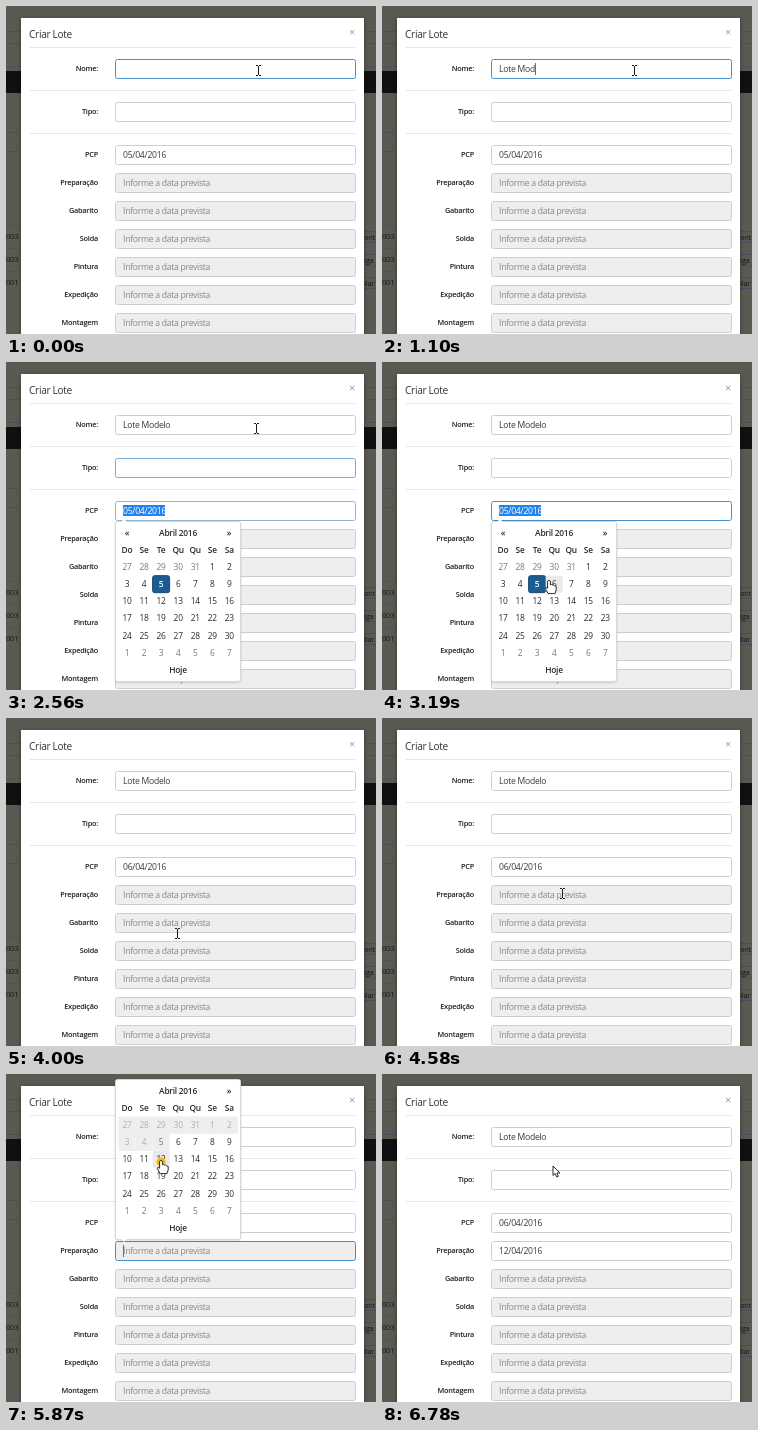
Write an HTML page with a canvas that moves like this. It is 370 px wide and 328 px high and loops after 6.81 s.

```html
<!DOCTYPE html>
<html lang="pt">
<head>
<meta charset="utf-8">
<title>Criar Lote</title>
<style>
  html, body { margin: 0; height: 100%; overflow: hidden; background: #5b5a52; }
  canvas { display: block; }
</style>
</head>
<body>
<canvas id="stage" width="370" height="328"></canvas>
<script>
const ctx = document.getElementById('stage').getContext('2d');
const LOOP = 6810;
const FONT = '"Open Sans", "Noto Sans", sans-serif';
const NAME = 'Lote Modelo';
const KEY_TIMES = [230, 290, 490, 560, 640, 710, 940, 1100, 1260, 1420, 1450];
const HINT = 'Informe a data prevista';
const PICK_PCP = 3480, PICK_PREP = 5960;   // moments a date is accepted
const BORDER = [200, 207, 217], FOCUS = [70, 144, 198];

// Pointer path: time, x, y
const PATH = [
  [0, 252, 64], [2520, 252, 64], [2650, 243, 74], [3060, 168, 221], [3190, 167, 218],
  [3500, 167, 218], [4000, 171, 215], [4100, 171, 215], [4700, 181, 170], [5180, 181, 170],
  [5800, 155, 86], [6000, 155, 86], [6520, 163, 88], [6600, 163, 88], [6780, 171, 91.5]
];

const clamp = v => Math.max(0, Math.min(1, v));
const between = (t, a, b) => t >= a && t < b;
const fade = (t, on, off) => clamp((t - on) / 150) - clamp((t - off) / 150);
const mix = (a, b, k) => `rgb(${a.map((v, i) => Math.round(v + (b[i] - v) * k))})`;

function setFont(size, weight = 400) {
  ctx.font = `${weight} ${size}px ${FONT}`;
  ctx.letterSpacing = `${-0.03 * size}px`;
}

function text(str, x, y, size, color, weight, align = 'left') {
  setFont(size, weight);
  ctx.fillStyle = color;
  ctx.textAlign = align;
  ctx.fillText(str, x, y);
}

function rect(x, y, w, h, color) {
  ctx.fillStyle = color;
  ctx.fillRect(x, y, w, h);
}

function roundBox(x, y, w, h, r, fill, stroke) {
  ctx.beginPath();
  ctx.roundRect(x, y, w, h, r);
  ctx.fillStyle = fill;
  ctx.fill();
  if (stroke) {
    ctx.shadowColor = 'transparent';
    ctx.strokeStyle = stroke;
    ctx.lineWidth = 1;
    ctx.stroke();
  }
}

function shadow(color, blur, dy) {
  ctx.shadowColor = color;
  ctx.shadowBlur = blur;
  ctx.shadowOffsetY = dy;
}

function drawPage() {
  rect(0, 0, 370, 328, '#5b5a52');
  for (const y of [25, 37, 60]) rect(0, y, 370, 1, '#4c5059');
  rect(0, 65, 370, 22, '#101010');
  for (const y of [126, 145]) rect(0, y, 13, 1, '#505054');
  ['003', '003', '001'].forEach((code, i) => {
    const y = 233 + i * 23;
    rect(0, y - 14, 15, 1, '#53534f');
    text(code, 0, y, 7.6, '#15181f');
    ctx.strokeStyle = '#474d5c';
    ctx.lineWidth = 1;
    ctx.strokeRect(350.5, y - 7.5, 30, 11);
    text(['ont', 'iga', 'ilar'][i], 358, y + 1, 7.6, '#15181f');
  });
}

function drawModal() {
  shadow('rgba(0,0,0,.35)', 5, 1);
  rect(15, 12, 343, 330, '#fff');
  shadow('transparent', 0, 0);
  text('Criar Lote', 23, 32, 10.1, '#2f343a');
  text('×', 346, 30, 11, '#999', 400, 'center');
  for (const y of [41, 84, 127]) rect(24, y, 325, 1, '#e6e6e6');
}

function drawField(f) {
  roundBox(109.5, f.y + .5, 240, 19, 2, f.disabled ? '#eee' : '#fff',
    mix(BORDER, FOCUS, f.focus || 0));
  text(f.label, 92, f.y + 12, 7.3, '#1c1c1c', 600, 'right');
  if (f.selected) rect(117, f.y + 4, 42, 11, '#2484ee');
  if (f.value) text(f.value, 117, f.y + 13, 8.6, f.selected ? '#fff' : '#383838');
  else if (f.disabled) text(HINT, 117, f.y + 13, 8.6, '#868686');
  if (f.caret) {
    setFont(8.6);
    rect(Math.round(117 + ctx.measureText(f.value || '').width), f.y + 4, 1, 12, '#707070');
  }
}

function drawFields(t) {
  const typed = NAME.slice(0, KEY_TIMES.filter(k => k <= t).length);
  const prepDone = t >= PICK_PREP;
  const fields = [
    { label: 'Nome:', y: 53, value: typed, focus: 1 - clamp((t - 2060) / 150),
      caret: between(t, 230, 1980) },
    { label: 'Tipo:', y: 96, focus: fade(t, 2060, 2500), caret: between(t, 2060, 2500) },
    { label: 'PCP', y: 139, value: t < PICK_PCP ? '05/04/2016' : '06/04/2016',
      focus: fade(t, 2500, PICK_PCP), selected: between(t, 2500, PICK_PCP) },
    { label: 'Preparação', y: 167, value: prepDone ? '12/04/2016' : '', disabled: !prepDone,
      focus: fade(t, 4730, PICK_PREP),
      caret: between(t, 4730, PICK_PREP) && Math.floor((t - 4730) / 500) % 2 === 0 }
  ];
  ['Gabarito', 'Solda', 'Pintura', 'Expedição', 'Montagem'].forEach((label, i) =>
    fields.push({ label, y: 195 + 28 * i, disabled: true }));
  fields.forEach(drawField);
}

// Calendar with its top edge at y; "limited" greys out the days before the 6th.
function drawPicker(y, limited, pointer) {
  const colX = c => 121 + c * 17.05;
  const rowY = r => y + 46 + r * 17.15;
  const heading = (str, x, dy) => text(str, x, y + dy, 8.4, '#2a2a2a', 600, 'center');
  shadow('rgba(0,0,0,.18)', 3, 1);
  roundBox(109.5, y + .5, 125, 160, 2, '#fff', '#d6d6d6');
  shadow('transparent', 0, 0);

  const tip = limited ? y + 163 : y - 2, base = limited ? y + 160 : y + 1;
  ctx.beginPath();
  ctx.moveTo(115, base);
  ctx.lineTo(118, tip);
  ctx.lineTo(121, base);
  ctx.fillStyle = '#fff';
  ctx.fill();

  if (!limited) heading('«', 121, 15);
  heading('Abril 2016', 172, 15);
  heading('»', 223, 15);
  ['Do', 'Se', 'Te', 'Qu', 'Qu', 'Se', 'Sa'].forEach((day, c) => heading(day, colX(c), 32));

  for (let i = 0; i < 42; i++) {
    const c = i % 7, r = Math.floor(i / 7), x = colX(c), cy = rowY(r);
    const day = i < 5 ? 27 + i : (i - 5) % 30 + 1;
    const outside = i < 5 || i > 34;
    const blocked = limited && i < 9;
    const current = i === 9;
    const hovered = !blocked && Math.abs(pointer.x - x) < 8.5 && Math.abs(pointer.y - cy) < 8.5;
    let color = outside ? '#777' : '#2a2a2a';
    if (blocked) color = '#b0b0b0';
    if (limited && i <= 9) rect(x - 8.5, cy - 8.5, 17.1, 17.2, '#eee');
    if (limited && current) color = '#66758a';
    if (hovered) roundBox(x - 8.5, cy - 8.5, 17, 17, 2, '#eaeaea');
    if (current && !limited) {
      roundBox(x - 8.5, cy - 8.5, 17, 17, 2, '#1d5c93', '#174a77');
      color = '#fff';
    }
    text(day, x, cy + 3, 8.4, color, current && !limited ? 600 : 400, 'center');
  }
  heading('Hoje', 172, 152);
}

function pointerAt(t) {
  let i = PATH.findIndex(p => p[0] > t);
  if (i < 0) i = PATH.length;
  const a = PATH[i - 1], b = PATH[i] || a;
  const k = clamp((t - a[0]) / (b[0] - a[0] || 1));
  const e = k * k * (3 - 2 * k);
  return { x: a[1] + (b[1] - a[1]) * e, y: a[2] + (b[2] - a[2]) * e };
}

const SHAPES = {
  arrow: new Path2D('M0 0V9.5L2.2 7.5L3.8 11L5.4 10.3L3.9 7H7Z'),
  hand: new Path2D('M-1.4 1.2Q0 -.6 1.4 1.2V4.8Q2.5 4 3.5 5.1Q4.6 4.5 5.4 5.7Q7 5.4 7.2 7V9.8L6 13.6H-.8L-3.8 8.6Q-4 6.6 -1.4 8.2Z')
};

function drawPointer({ x, y }, overPicker) {
  const overField = [53, 96, 139, 167, 195, 223].some(top => y >= top && y <= top + 20);
  ctx.save();
  ctx.translate(Math.round(x), Math.round(y));
  if (!overPicker && overField) {
    rect(0, -4, 1, 9, '#1a1a1a');
    for (const end of [-5, 5]) {
      rect(-2, end, 2, 1, '#1a1a1a');
      rect(1, end, 2, 1, '#1a1a1a');
    }
  } else {
    const shape = SHAPES[overPicker ? 'hand' : 'arrow'];
    ctx.lineWidth = 1;
    ctx.lineJoin = 'round';
    ctx.fillStyle = '#fff';
    ctx.strokeStyle = '#2a2a2a';
    ctx.fill(shape);
    ctx.stroke(shape);
  }
  ctx.restore();
}

function draw(t) {
  const pointer = pointerAt(t);
  const below = between(t, 2500, PICK_PCP), above = between(t, 4730, PICK_PREP);
  drawPage();
  drawModal();
  drawFields(t);
  if (below) drawPicker(159, false, pointer);
  if (above) drawPicker(5, true, pointer);
  if (between(t, 3390, PICK_PCP) || between(t, 5840, PICK_PREP)) {
    ctx.beginPath();
    ctx.arc(pointer.x, pointer.y + 2, 4.5, 0, 7);
    ctx.fillStyle = '#f3b90f';
    ctx.fill();
  }
  drawPointer(pointer, below && pointer.y > 159 || above && pointer.y < 165);
}

const start = performance.now();
function tick() {
  draw((performance.now() - start) % LOOP);
  requestAnimationFrame(tick);
}
tick();
</script>
</body>
</html>
```
